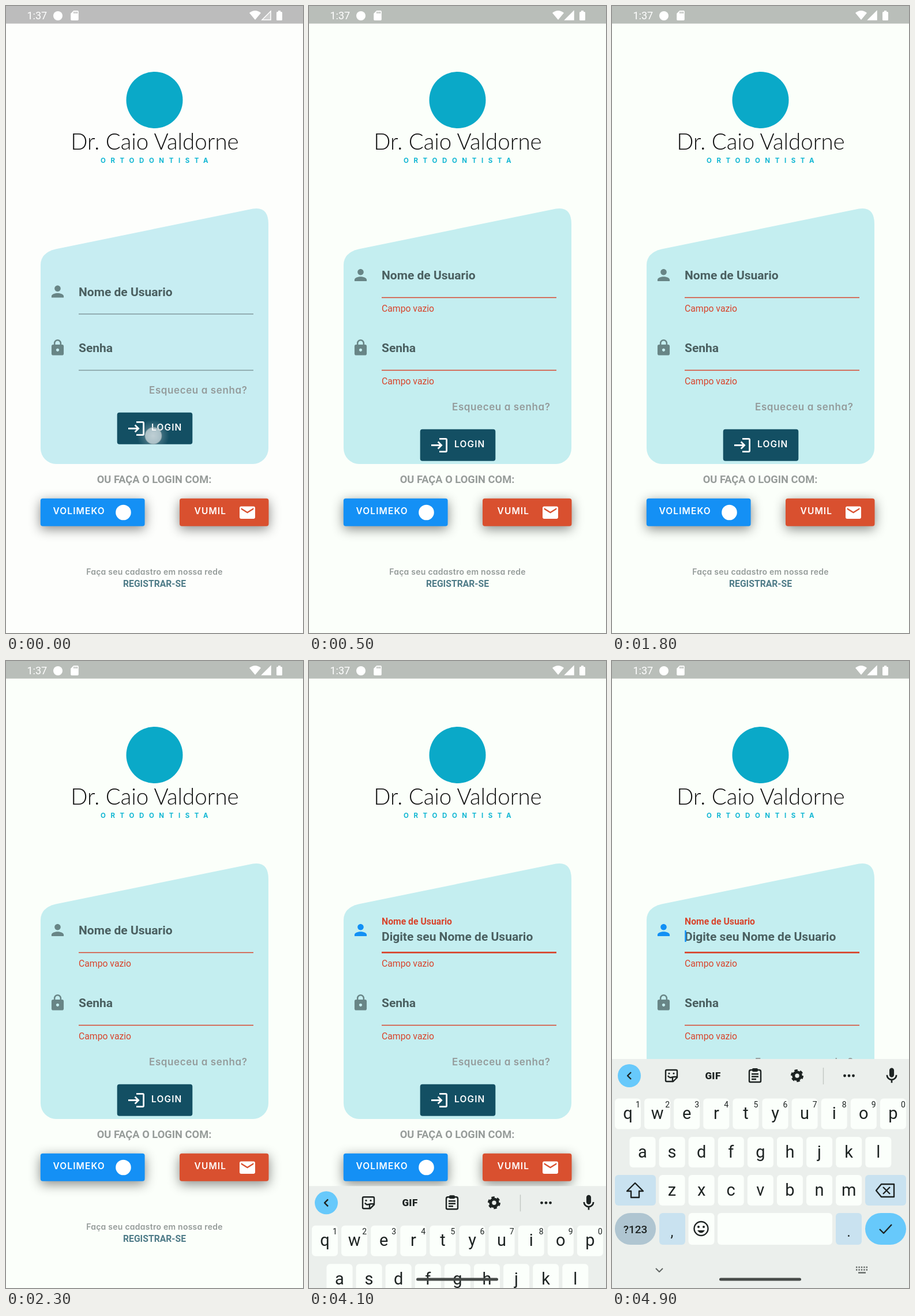
An HTML page that plays this animation: 515x1087 px, repeating every 5000 ms.

```html
<!DOCTYPE html>
<html lang="pt-BR">
<head>
<meta charset="utf-8">
<title>Login</title>
<style>
  html, body { margin: 0; width: 100%; height: 100%; overflow: hidden; background: #fbfffa; }
  svg { display: block; width: 515px; height: 1087px; font-family: Roboto, sans-serif; }
  .round { font-family: Inter, sans-serif; font-weight: 600; font-feature-settings: "cv11"; }
  .caps { font-size: 15.5px; letter-spacing: 1.1px; fill: #fff; }
  .label { font-size: 21px; font-weight: 700; fill: #4a5f60; }
  .error { font-size: 15.75px; fill: #d8442c; }
  .mid { text-anchor: middle; }
  .raised { filter: drop-shadow(0 5px 10px #0007); }
  .key { font-size: 29px; text-anchor: middle; }
  .digit { font-size: 14px; text-anchor: middle; }
  .line { fill: none; stroke: #1d2322; stroke-width: 2.4; stroke-linejoin: round; }
</style>
</head>
<body>
<svg id="stage" viewBox="0 0 515 1087"></svg>
<script>
const RED = '#d8442c', GREY = '#4a5f60', BLUE = '#1290f5', DARK = '#1d2322';

const PATHS = {
  person: 'M12 12c2.21 0 4-1.79 4-4s-1.79-4-4-4-4 1.79-4 4 1.79 4 4 4zm0 2c-2.67 0-8 1.34-8 4v2h16v-2c0-2.66-5.33-4-8-4z',
  lock: 'M18 8h-1V6c0-2.76-2.24-5-5-5S7 3.24 7 6v2H6c-1.1 0-2 .9-2 2v10c0 1.1.9 2 2 2h12c1.1 0 2-.9 2-2V10c0-1.1-.9-2-2-2zm-6 9c-1.1 0-2-.9-2-2s.9-2 2-2 2 .9 2 2-.9 2-2 2zm3.1-9H8.9V6c0-1.71 1.39-3.1 3.1-3.1s3.1 1.39 3.1 3.1v2z',
  enter: 'M11 7L9.6 8.4l2.6 2.6H2v2h10.2l-2.6 2.6L11 17l5-5zM20 19h-8v2h8c1.1 0 2-.9 2-2V5c0-1.1-.9-2-2-2h-8v2h8z',
  mail: 'M20 4H4c-1.1 0-2 .9-2 2v12c0 1.1.9 2 2 2h16c1.1 0 2-.9 2-2V6c0-1.1-.9-2-2-2zm0 4l-8 5-8-5V6l8 5 8-5z',
  card: 'M18 2h-8L4 8v12c0 1.1.9 2 2 2h12c1.1 0 2-.9 2-2V4c0-1.1-.9-2-2-2zm-6 6h-2V4h2zm3 0h-2V4h2zm3 0h-2V4h2z',
  mic: 'M12 14c1.66 0 3-1.34 3-3V5c0-1.66-1.34-3-3-3S9 3.34 9 5v6c0 1.66 1.34 3 3 3zm5-3c0 2.76-2.24 5-5 5s-5-2.24-5-5H5c0 3.53 2.61 6.43 6 6.92V21h2v-3.08c3.39-.49 6-3.39 6-6.92z'
};

// Places a 24-unit icon with its centre at (x, y)
const icon = (name, x, y, scale, fill, id = '') =>
  `<path ${id && `id="${id}"`} d="${PATHS[name]}" fill="${fill}" transform="translate(${x} ${y}) scale(${scale}) translate(-12 -12)"/>`;
const rect = (x, y, w, h, r, fill) =>
  `<rect x="${x}" y="${y}" width="${w}" height="${h}" rx="${r}" fill="${fill}"/>`;
const text = (x, y, cls, content, attrs = '') =>
  `<text x="${x}" y="${y}" class="${cls}" ${attrs}>${content}</text>`;
const line = (d, attrs = '') => `<path class="line" d="${d}" ${attrs}/>`;
const loginBox = fill => rect(192.7, 733.7, 130.6, 55, 4, fill);

function statusBar() {
  return `<rect id="bar" width="515" height="30.5"/>
    ${text(36.500, 23.3, '', '1:37', 'font-size="18" fill="#fff"')}
    <g fill="#fff">
      <circle cx="90" cy="17" r="8"/>
      ${icon('card', 119, 16.5, .85, '#fff')}
      <path d="M422 12Q432 4 442 12L432 24Z"/>
      <path id="signal" d="M459 9V24H444Z" stroke="#fff" stroke-width="1.5"/>
      ${rect(469, 10, 10, 15, 1.5, '#fff')}${rect(472, 8, 4, 3, 0, '#fff')}
    </g>`;
}

function header() {
  return `<circle cx="257.5" cy="163" r="49" fill="#0aa9c8"/>
    ${text(258, 249, 'mid', 'Dr. Caio Valdorne', 'font-family="Lato, sans-serif" font-weight="300" font-size="38.5" fill="#111"')}
    ${text(164, 272, 'round', 'ORTODONTISTA', 'style="font-weight:700" font-size="11.5" letter-spacing="8.6" fill="#10b7d3"')}`;
}

function form() {
  return `<path id="panel" d="M60 449Q60 428 86 421.5L428 351.5Q455 347 455 378V767A27 27 0 0 1 428 794H87A27 27 0 0 1 60 767Z"/>
    <g id="user">
      ${icon('person', 89.5, 466.5, 1.32, '#688586', 'userIcon')}
      <text id="userLabel" class="label">Nome de Usuario</text>
      ${text(126, 485, 'label', 'Digite seu Nome de Usuario', 'id="hint"')}
      <path id="userLine" d="M126 505.4H429"/>
      <path id="caret" d="M127.5 467V487" stroke="${BLUE}" stroke-width="2.5"/>
    </g>
    ${icon('lock', 89.5, 592.4, 1.32, '#688586')}
    ${text(126, 600, 'label', 'Senha')}
    <path id="passLine" d="M126 631.4H429"/>
    <g id="errors">${text(126, 530.3, 'error', 'Campo vazio')}${text(126, 656.3, 'error', 'Campo vazio')}</g>
    <g id="actions">
      ${text(248, 701.4, 'round', 'Esqueceu a senha?', 'font-size="17" letter-spacing=".6" fill="#949b9b"')}
      ${loginBox('#134f63')}
      <circle id="ripple" cx="255" cy="774" r="28" fill="url(#glow)" clip-path="url(#loginClip)"/>
      ${icon('enter', 226, 761.5, 1.4, '#fff')}
      ${text(252, 765, 'round caps', 'LOGIN')}
    </g>`;
}

function footer() {
  return `${text(257, 826.8, 'mid', 'OU FAÇA O LOGIN COM:', 'font-size="18.3" font-weight="700" fill="#979c9a"')}
    <g class="raised">${rect(59.8, 853.8, 180.8, 48, 4, '#1490f5')}${rect(301, 853.8, 154.5, 48, 4, '#d9502f')}</g>
    ${text(81.5, 881.4, 'round caps', 'VOLIMEKO')}
    <circle cx="203.5" cy="878" r="13.3" fill="#fff"/>
    ${text(326.5, 881.4, 'round caps', 'VUMIL')}
    ${icon('mail', 418.5, 878.2, 1.35, '#fff')}
    ${text(257.5, 986.4, 'round mid', 'Faça seu cadastro em nossa rede', 'font-size="14" letter-spacing=".25" fill="#949b99"')}
    ${text(257.5, 1007.4, 'mid', 'REGISTRAR-SE', 'font-size="15.75" font-weight="700" fill="#4f7c88"')}`;
}

function toolbar() {
  return `<circle cx="30" cy="719" r="20" fill="#67c9fb"/>
    ${line('M33 713L27 719L33 725')}
    ${line('M95 709H111Q113 709 113 711V722L106 729H95Q93 729 93 727V711Q93 709 95 709ZM113 721H107Q105 721 105 723V729M97 719Q100 724 105 721')}
    <circle cx="99" cy="715" r="1.6"/><circle cx="107" cy="715" r="1.6"/>
    ${text(175, 725, 'mid', 'GIF', 'font-size="17" font-weight="900" letter-spacing=".4"')}
    ${line('M241 709H255Q258 709 258 712V728Q258 730 256 730H240Q238 730 238 728V712Q238 709 241 709ZM242 716H254M242 720.5H254M242 725H250')}
    ${rect(243, 706, 10, 6, 2, DARK)}
    <g fill="none" stroke="${DARK}"><circle cx="321" cy="719" r="6.2" stroke-width="5"/>
      <circle cx="321" cy="719" r="9.5" stroke-width="3" stroke-dasharray="5.5 4.45"/></g>
    <path d="M366.5 705V734" stroke="#c3c8c5" stroke-width="1.5"/>
    ${[403.5, 411, 418.5].map(x => `<circle cx="${x}" cy="719" r="2.4"/>`).join('')}
    ${icon('mic', 485, 719, 1.35, DARK)}`;
}

function keyboard() {
  const WHITE = '#fbfffb', TINT = '#c9e2f0', PITCH = 51.1;
  const row = (letters, firstX, top, digits = '') => [...letters].map((letter, i) => {
    const x = firstX + i * PITCH;
    return rect(x - 22.5, top, 45, 53, 6, WHITE) + text(x, top + 35.5, 'key', letter) +
      (digits ? text(x + 17.5, top + 15, 'digit', digits[i]) : '');
  }).join('');
  return rect(0, 690, 515, 420, 0, '#ebefec') + toolbar() +
    row('qwertyuiop', 27.5, 758.5, '1234567890') +
    row('asdfghjkl', 53, 825) +
    rect(5, 891, 71, 53, 6, TINT) + row('zxcvbnm', 104, 891) + rect(439, 891, 71, 53, 6, TINT) +
    line('M40 905L54 919H47V930H33V919H26Z') +
    line('M467 907H489V929H467L458 918ZM470 912L482 924M482 912L470 924') +
    rect(5, 957, 71, 55, 27, '#afc5d1') +
    text(40.5, 992, 'mid', '?123', 'font-size="19" font-weight="500"') +
    rect(82, 957, 45, 55, 6, TINT) + text(104, 998, 'key', ',', 'style="font-size:25px"') +
    rect(132.5, 957, 45, 55, 6, WHITE) +
    `<circle class="line" cx="154.5" cy="984" r="12"/><circle cx="150" cy="981" r="2"/><circle cx="159" cy="981" r="2"/>` +
    '<path d="M148 987H161Q154.5 996 148 987Z"/>' +
    rect(183, 957, 199, 55, 6, WHITE) +
    rect(388, 957, 45, 55, 6, TINT) + text(410.5, 998, 'key', '.', 'style="font-size:25px"') +
    rect(439, 957, 71, 55, 27.5, '#67c9fb') + line('M464 985L471 992L485 977') +
    line('M76 1053L82 1059L88 1053', 'style="stroke:#626765;stroke-width:2"') +
    `<g fill="none" stroke="#626765" stroke-width="2.4" stroke-dasharray="2.4 2">
      <path d="M423 1051H444M423 1055.5H444"/><path d="M427 1060.5H440" stroke-dasharray="none"/></g>`;
}

const touch = (id, x, y, opacity) =>
  `<circle id="${id}" cx="${x}" cy="${y}" r="14.5" fill="#fff" fill-opacity="${opacity}" stroke="#879a9d" stroke-opacity=".4" stroke-width="1.5"/>`;

document.getElementById('stage').innerHTML = `
  <defs>
    <radialGradient id="glow"><stop stop-color="#fff" stop-opacity=".4"/><stop offset="1" stop-color="#fff" stop-opacity="0"/></radialGradient>
    <clipPath id="loginClip">${loginBox('#000')}</clipPath>
  </defs>
  <rect id="page" width="515" height="1087"/>
  ${statusBar()}${header()}${form()}${footer()}
  ${touch('loginTouch', 255.5, 745, .55)}${touch('fieldTouch', 179.5, 496.5, .35)}
  <g id="keyboard" fill="${DARK}">${keyboard()}</g>
  <g id="homePill">${rect(186, 1069.5, 142, 5, 2.5, '#474b49')}</g>`;

const VALIDATE = 200, FOCUS = 3500, CARET = 3600, KEYBOARD = 4000;
const clamp = v => Math.min(1, Math.max(0, v));
const span = (t, start, length) => clamp((t - start) / length);
const easeOut = p => 1 - (1 - p) ** 2;
const set = (id, attrs) => {
  const element = document.getElementById(id);
  for (const name in attrs) element.setAttribute(name, attrs[name]);
};
const show = (id, on) => set(id, { visibility: on ? 'visible' : 'hidden' });

function draw(t) {
  const invalid = t >= VALIDATE, focused = t >= FOCUS;
  const float = easeOut(span(t, FOCUS, 200));
  const error = easeOut(span(t, VALIDATE, 170));
  const slide = easeOut(span(t, KEYBOARD, 392));

  set('page', { fill: invalid ? '#fbfffa' : '#fdfefc' });
  set('bar', { fill: invalid ? '#b9beb9' : '#bcbcbc' });
  set('panel', { fill: invalid ? '#c4eef0' : '#c7edf2' });
  set('signal', { 'fill-opacity': invalid ? 1 : .3 });

  set('user', { transform: `translate(0 ${invalid ? 0 : 28.5})` });
  set('actions', { transform: `translate(0 ${invalid ? 0 : -29})` });
  set('errors', { opacity: error, transform: `translate(0 ${-4 * (1 - error)})` });
  const stroke = invalid ? RED : '#80989b';
  set('userLine', { stroke, 'stroke-width': focused ? 2.8 : 1.5 });
  set('passLine', { stroke, 'stroke-width': 1.5 });

  set('userIcon', { fill: focused ? BLUE : '#688586' });
  set('userLabel', {
    transform: `translate(126 ${474 - 17 * float}) scale(${1 - .25 * float})`,
    style: `fill: color-mix(in srgb, ${RED} ${float * 100}%, ${GREY})`
  });
  set('hint', { opacity: float });
  show('caret', t >= CARET && Math.floor((t - CARET) / 500) % 2 === 0);

  show('loginTouch', t < VALIDATE);
  set('ripple', { opacity: 1 - span(t, 100, 200) });
  show('fieldTouch', t >= 3300 && t < FOCUS);

  set('keyboard', { transform: `translate(0 ${397 * (1 - slide)})` });
  show('homePill', slide > 0);
}

function tick() {
  draw(Math.floor(performance.now() % 5000 / 100) * 100);
  requestAnimationFrame(tick);
}
tick();
</script>
</body>
</html>
```
